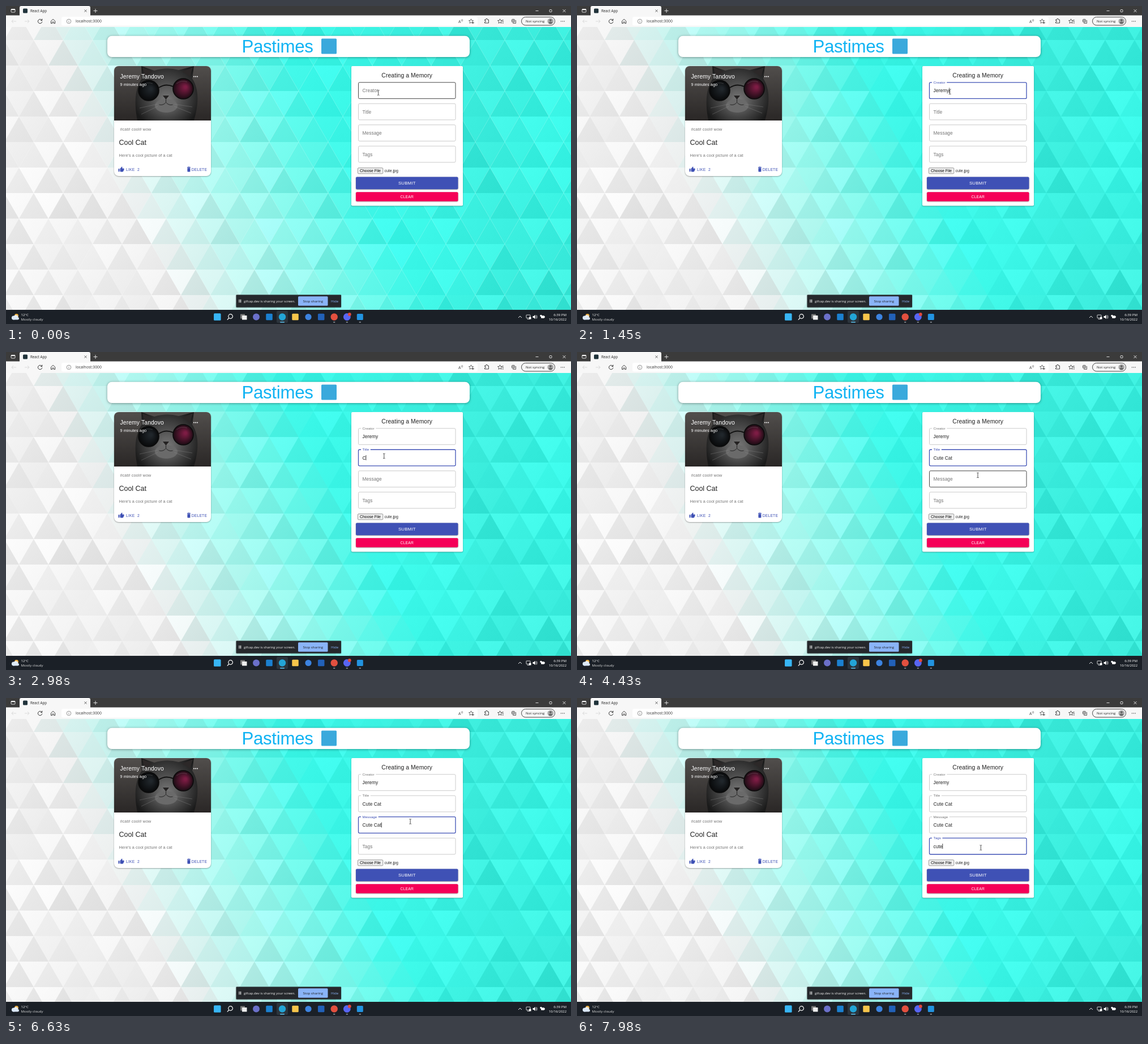
These frames come from a looping animation (998x561 px, 8 s). An HTML page with a canvas:

```html
<!DOCTYPE html>
<html lang="en">
<head>
<meta charset="utf-8">
<title>Creating a Memory</title>
<style>
html, body { margin: 0; width: 100%; height: 100%; overflow: hidden; }
canvas { display: block; }
</style>
</head>
<body>
<canvas id="stage" width="998" height="561"></canvas>
<script>
const W = 998, H = 561, LOOP = 8000;
const ARIAL = '"Liberation Sans", Arial, sans-serif';
const UI = '"Open Sans", "Noto Sans", sans-serif';
const INDIGO = '#3f51b5', INK = '#212121', GREY = '#757575';
const screen = document.getElementById('stage').getContext('2d');
const backdrop = document.createElement('canvas');
backdrop.width = W;
backdrop.height = H;
let g = backdrop.getContext('2d');

const clamp = v => Math.max(0, Math.min(1, v));
const lerp = (a, b, k) => a + (b - a) * k;
const mix = (a, b, k) => a.map((v, i) => lerp(v, b[i], k));
const rgb = c => `rgb(${c.map(Math.round)})`;
const noise = n => { const v = Math.sin(n * 127.1 + 11.7) * 43758.5453; return v - Math.floor(v); };

// y is the middle of the capitals; spacing is in em
function text(s, x, y, size, color, { font = ARIAL, align = 'left', spacing = 0, weight = 400 } = {}) {
  g.font = `${weight} ${size}px ${font}`;
  g.letterSpacing = spacing * size + 'px';
  g.textAlign = align;
  g.fillStyle = color;
  g.fillText(s, x, y + size * 0.36);
}
const ui = (s, x, y, size, color, opts) => text(s, x, y, size, color, { font: UI, ...opts });

function box(x, y, w, h, r, fill, blur = 0) {
  g.save();
  if (blur) {
    g.shadowColor = 'rgba(0,0,0,.4)';
    g.shadowBlur = blur;
    g.shadowOffsetY = 0.8;
  }
  g.fillStyle = fill;
  g.beginPath();
  g.roundRect(x, y, w, h, r);
  g.fill();
  g.restore();
}
function frame(x, y, w, h, r, color, width = 1) {
  g.strokeStyle = color;
  g.lineWidth = width;
  g.beginPath();
  g.roundRect(x, y, w, h, r);
  g.stroke();
}
function oval(x, y, rx, ry, fill) {
  g.fillStyle = fill;
  g.beginPath();
  g.ellipse(x, y, rx, ry, 0, 0, 7);
  g.fill();
}
const dot = (x, y, r, fill) => oval(x, y, r, r, fill);
const square = (x, y, size, fill) => box(x - size / 2, y - size / 2, size, size, 1.5, fill);
function line(d, color, width = 0.8) {
  g.strokeStyle = color;
  g.lineWidth = width;
  g.stroke(new Path2D(d));
}
function shape(d, color) {
  g.fillStyle = color;
  g.fill(new Path2D(d));
}

const bump = (x, y, rx, ry) => Math.exp(-((x / rx) ** 2 + (y / ry) ** 2));

// White on the left turns to turquoise along a slanted edge, with a few bright patches
function drawTriangles() {
  const side = 52, rowH = 45;
  for (let r = 0; r < 12; r++) {
    const top = 15 + r * rowH;
    for (let i = -2; i < 42; i++) {
      const x = i * side / 2 - 3, up = (i + r) % 2 === 0, mid = x + side / 2;
      const cyan = clamp((mid - 45 - top * 0.53) / 430);
      const glow = clamp(bump(mid - 560, top - 120, 190, 190) + bump(mid - 710, top - 420, 150, 140)
        + bump(mid - 990, top - 220, 100, 170));
      const base = mix(mix([240, 240, 240], [160, 250, 240], clamp(cyan * 2)), [62, 236, 220], clamp(cyan * 2 - 1));
      const lit = mix(base, [Math.min(base[0], 150), 255, 240], glow * 0.8 * clamp(cyan * 2));
      const shade = ((up ? -7 : 6) + (noise(r * 61 + i) - 0.5) * 14) * (1 - glow * 0.3);
      const color = lit.map(v => Math.min(255, v + shade));
      const fill = g.createLinearGradient(x, top, x + side, top + rowH);
      fill.addColorStop(0, rgb(mix(color, [255, 255, 255], 0.1 * (1 - cyan))));
      fill.addColorStop(1, rgb(color.map(v => v - 4)));
      const a = up ? top + rowH : top, b = up ? top : top + rowH;
      shape(`M${x} ${a}h${side}L${mid} ${b}z`, fill);
    }
  }
}

function drawBrowser() {
  box(0, 0, W, 17, 0, '#3b3b3b');
  box(0, 16.5, W, 20.5, 0, '#f7f7f7');
  box(24, 0, 125, 18, [3, 3, 0, 0], '#f7f7f7');
  frame(9, 5.5, 7, 5.5, 1, '#fff', 0.8);
  box(9, 5.5, 7, 1.6, 0, '#fff');
  square(34, 8.5, 8, '#20333b');
  ui('React App', 43, 8.5, 6.2, '#222');
  line('M138.5 6.5l4 4m0-4l-4 4', '#333');
  line('M154.5 8.5h7m-3.5-3.5v7M935.5 8.5h5M983.5 6l5 5m0-5l-5 5', '#fff');
  frame(960, 6.5, 4, 4, 1, '#fff', 0.8);

  box(98, 19, 735, 15.5, 3, '#fff');
  line('M18 27h-8m3-3l-3 3l3 3M33 27h8m-3-3l3 3l-3 3', '#d2d2d2');
  line('M63.2 25a3.7 3.7 0 1 0 .6 2.6M63.8 22.6v2.8h-2.8', '#333', 1);
  line('M79.5 26.5l3.6-3.2l3.6 3.2v4.2h-2.4v-2.6h-2.4v2.6h-2.4z', '#333', 0.9);
  line('M107.2 27a3.8 3.8 0 1 0 7.6 0a3.8 3.8 0 1 0-7.6 0M111 26.4v2.6M111 24.8v.8', '#666', 0.7);
  ui('localhost:3000', 123, 27, 6.8, '#333');
  ui('A', 799, 27.5, 7, '#444');
  line('M804 24q1.5 1 0 2.5M805.5 23q2.5 2 0 4.5', '#444', 0.6);
  const star = 'l1.2 2.6l2.8.3l-2.1 1.9l.6 2.8l-2.5-1.4l-2.5 1.4l.6-2.8l-2.1-1.9l2.8-.3z';
  line('M821.5 22.8' + star + 'M823 29.5h4m-2-2v4', '#444', 0.8);
  line('M845.5 24.2h2q0-2 1.5-2t1.5 2h2v5.8h-7v-1.8q2 0 2-1.4t-2-1.4z', '#333', 0.9);
  line('M872.5 22.8' + star + 'M876 25h3M876.5 27.5h2.5M876.5 30h2.5', '#333', 0.8);
  frame(893.5, 23.5, 5, 5, 1, '#333', 0.9);
  line('M895 30.5h5.5v-5.5M896 24.5v3M894.5 26h3', '#333', 0.8);
  frame(910.5, 19.5, 59, 14.5, 7.2, '#333', 0.9);
  ui('Not syncing', 918, 27, 6.1, '#222');
  dot(961.8, 26.8, 5.4, '#aaa');
  dot(961.8, 25.2, 1.9, '#666');
  oval(961.8, 29.6, 3.1, 1.9, '#666');
  for (const x of [980.5, 983.3, 986.1]) dot(x, 27, 0.7, '#333');
}

function drawCat() {
  g.save();
  g.beginPath();
  g.roundRect(191, 106, 171, 96, [8, 8, 0, 0]);
  g.clip();
  const wall = g.createLinearGradient(0, 106, 0, 202);
  wall.addColorStop(0, '#514e4c');
  wall.addColorStop(1, '#2a2726');
  box(191, 106, 171, 96, 0, wall);
  const fur = g.createRadialGradient(284, 168, 4, 284, 156, 62);
  fur.addColorStop(0, '#757575');
  fur.addColorStop(0.45, '#4a4a4a');
  fur.addColorStop(1, '#1a1a1a');
  shape('M232 202C226 170 228 145 240 128L239 106L262 114Q284 107 305 113L332 106L329 128C342 148 340 175 332 202z', fur);
  shape('M241 108l4 17l13-9zM330 108l-5 16l-14-8z', '#2c2828');
  oval(283, 176, 20, 12, '#6a6a6a');
  shape('M277 158h11l-5.5 7z', '#242222');
  line('M282.5 165v5q-5 6-12 4M282.5 170q5 6 12 4', '#262626', 1);
  line('M268 173l-32 7M268 177l-29 14M297 173l32 5M297 177l30 12', '#888', 0.4);
  for (const [x, y, inner, outer] of [[252, 149, '#20262b', '#08090a'], [313, 146, '#7d1c44', '#1b0c13']]) {
    const lens = g.createRadialGradient(x + 4, y - 3, 2, x, y, 18);
    lens.addColorStop(0, inner);
    lens.addColorStop(1, outer);
    dot(x, y, 18, lens);
    line(`M${x - 18} ${y}a18 18 0 1 0 36 0a18 18 0 1 0-36 0`, '#0b0b0b', 1.6);
    line(`M${x - 12} ${y - 9}q9-7 19-3`, 'rgba(255,255,255,.2)', 0.8);
  }
  line('M270 144q12-8 25-2', '#111', 2);
  g.restore();
}

function drawPost() {
  box(191, 106, 171, 194, 8, '#fff', 2);
  drawCat();
  text('Jeremy Tandovo', 201.5, 124.5, 10.4, '#fff', { spacing: 0.0075 });
  const small = { spacing: 0.0107 };
  text('9 minutes ago', 201.5, 138, 7.28, '#fff', small);
  for (const x of [332, 335, 338]) dot(x, 124.5, 1, '#fff');
  text('#cat# cool# wow', 201.5, 217.3, 7.28, GREY, small);
  text('Cool Cat', 199.5, 241, 12.48, INK);
  text("Here's a cool picture of a cat", 199.5, 263.3, 7.28, GREY, small);
  box(198.5, 287, 2, 5.2, 0, INDIGO);
  shape('M201.5 287l3.2-3.7l.9.9l-.5 2.3h2.6q1.2.2 1 1.4l-1.4 3.7q-.4.8-1.2.8h-3.4q-1.2-.2-1.2-1.2z', INDIGO);
  const caps = { spacing: 0.0286 };
  text('LIKE', 212, 288.2, 6.76, INDIGO, caps);
  text('2', 232, 288.2, 6.76, INDIGO, caps);
  shape('M320 285h5.8v-.9h-1.5l-.5-.5h-1.8l-.5.5h-1.5zM320.4 285.6h5v6q0 .9-.9.9h-3.2q-.9 0-.9-.9z', INDIGO);
  text('DELETE', 327.7, 288.2, 6.76, INDIGO, caps);
}

function drawForm() {
  box(610, 106, 197, 246.5, 2, '#fff', 2);
  text('Creating a Memory', 708.2, 122.3, 10.4, INK, { align: 'center', spacing: 0.0075 });
  box(621, 285.3, 45, 10.8, 1.5, '#efefef');
  frame(621.4, 285.6, 44.4, 10.2, 1.5, '#767676', 0.7);
  text('Choose File', 625, 291, 6.93, '#000');
  text('cute.jpg', 668.5, 291, 6.93, '#222');
  const caps = { align: 'center', spacing: 0.0286 };
  box(618, 301.5, 180.5, 21.7, 2, INDIGO, 2);
  text('SUBMIT', 708.3, 312.3, 7.8, '#fff', caps);
  box(618, 328.3, 180.5, 16.2, 2, '#f50057', 2);
  text('CLEAR', 708.3, 336.3, 6.76, '#fff', caps);
}

function drawShareBar() {
  box(406.5, 509.5, 185.5, 22, 1, '#25282c', 2);
  box(411.5, 517.7, 1.1, 5.6, 0, '#fff');
  box(414, 517.7, 1.1, 5.6, 0, '#fff');
  ui('gifcap.dev is sharing your screen.', 420, 520.5, 5.9, '#f1f1f1');
  box(516, 512.3, 52.5, 16.5, 1.5, '#8ab4f8');
  ui('Stop sharing', 542.2, 520.5, 6.1, '#202124', { align: 'center' });
  ui('Hide', 574, 520.5, 6.1, '#8ab4f8');
}

function drawTaskbar() {
  const y = 548.5;
  box(0, 536, W, 25, 0, '#1b2027');
  dot(18.5, 546.5, 3.4, '#f3b443');
  dot(13.5, 550, 3.6, '#d8e6f7');
  dot(17.5, 549, 3.8, '#e6effb');
  box(11, 549, 12, 4.6, 2.3, '#dbe8f8');
  ui('12°C', 26.5, 545, 6.1, '#fff');
  ui('Mostly cloudy', 26.5, 553, 6.1, '#ddd');

  box(478, 538, 20, 21, 2, '#2c343c');
  square(373.3, y, 12.5, '#38b6f5');
  line('M392.8 547.5a3.8 3.8 0 1 0 7.6 0a3.8 3.8 0 1 0-7.6 0M393.8 550.5l-3 3.2', '#fff', 1.2);
  box(414, 543.5, 8, 8, 0.5, '#777');
  box(417, 546, 8.5, 7.5, 0.5, '#eee');
  dot(442, y, 6, '#6b70ca');
  square(465, y, 11.5, '#1b80d0');
  dot(488, y, 6.2, '#23a4d6');
  square(511, y, 11.5, '#f6c54b');
  dot(534, y, 5.6, '#3c83e0');
  square(556.7, y, 11.5, '#2261b8');
  dot(579.7, y, 6.2, '#e2503f');
  dot(602.3, y, 6.4, '#5865f2');
  dot(606.8, 544, 2.9, '#e0493c');
  square(625.3, y, 11, '#2293e0');
  box(484, 557, 8, 1.4, 0.7, '#5cc4f2');
  for (const x of [579.7, 602.3, 625.3]) box(x - 1.7, 557, 3.4, 1.4, 0.7, '#9a9fa5');

  line('M905 550l3-3l3 3', '#fff', 0.9);
  frame(919, 545, 7, 5.5, 0.5, '#fff', 0.8);
  line('M920.5 552.5h4.5', '#fff');
  box(924, 548.5, 3.5, 4, 0.5, '#fff');
  shape('M930.5 547h1.8l2.4-2.2v7.4l-2.4-2.2h-1.8z', '#fff');
  line('M935.8 546.5q1.6 2 0 4M937 545.2q2.6 3.3 0 6.6', '#fff', 0.7);
  box(945, 546.3, 6, 4.4, 1, '#fff');
  box(951, 547.6, 1, 1.8, 0, '#fff');
  dot(945, 546.5, 1.7, '#fff');
  ui('6:39 PM', 990, 544.8, 6.1, '#fff', { align: 'right' });
  ui('10/16/2022', 990, 552.8, 5.9, '#fff', { align: 'right' });
}

function drawBackdrop() {
  drawTriangles();
  drawBrowser();
  box(179, 52.8, 640, 37.2, 8, '#fff', 4);
  text('Pastimes', 479.5, 70.7, 31.2, '#10b3f3', { align: 'center', spacing: -0.0083 });
  square(570.5, 71, 27, '#3aa9dc');
  drawPost();
  drawForm();
  drawShareBar();
  drawTaskbar();
}

const refreshes = [
  0, [90, 330, 4], 660, 910, [1150, 1450, 5], [1950, 2020, 2], [2190, 2420, 4], 2740, 2980,
  [3150, 3310, 3], 3560, 3810, 4050, [4200, 4430, 4], [4600, 4760, 3], 5080, 5250, [5400, 5560, 3],
  5880, 6140, [6390, 6460, 2], [6630, 6700, 2], [6870, 7330, 7], 7570, [7810, 7980, 3]
].flatMap(s => s.length
  ? Array.from({ length: s[2] }, (_, i) => lerp(s[0], s[1], i / (s[2] - 1)))
  : s);
const snap = t => refreshes.findLast(s => s <= t);

const fields = [
  { label: 'Creator', value: 'Jeremy', focus: 150, keys: [910, 1150, 1225, 1300, 1375, 1450] },
  { label: 'Title', value: 'Cute Cat', focus: 2210, keys: [2980, 3150, 3230, 3310, 3310, 3560, 3810, 3810] },
  { label: 'Message', value: 'Cute Cat', focus: 4560, keys: [5250, 5400, 5480, 5560, 5880, 6140, 6390, 6460] },
  { label: 'Tags', value: 'cute', focus: 7080, keys: [7570, 7810, 7895, 7980] }
];
const pointerPath = [
  [0, 657.7, 153], [90, 658.7, 151.3], [1880, 658.7, 151.3], [2020, 667.8, 183.5], [3900, 667.8, 183.5],
  [4050, 668.6, 183.3], [4200, 674, 188], [4430, 708, 217.3], [4600, 709.3, 217.3], [6560, 709.3, 217.3],
  [6700, 719, 218.5], [6870, 718, 230], [7020, 713.3, 264], [LOOP, 713.3, 264]
];
function pointerAt(t) {
  const i = pointerPath.findIndex(p => p[0] > t);
  const a = pointerPath[i - 1], b = pointerPath[i];
  return mix(a, b, (t - a[0]) / (b[0] - a[0])).slice(1);
}

function drawField(field, i, t, pointer) {
  const x = 622.5, w = 171.5, h = 28.6, top = 134.8 + i * 37.45, mid = top + 14.4;
  const blur = fields[i + 1]?.focus ?? Infinity;
  const focused = t >= field.focus && t < blur;
  const hover = Math.abs(pointer[1] - mid) < h / 2;
  const k = clamp((t - field.focus) / 200), rise = 1 - (1 - k) ** 3;
  const blue = focused ? rise : t < blur ? 0 : 1 - clamp((t - blur) / 200);
  const body = { spacing: 0.0094 };

  frame(x, top, w, h, 2, focused ? INDIGO : hover ? '#333' : '#c6c6c6', focused ? 1.3 : 0.9);
  const size = lerp(8.32, 6.24, rise), y = lerp(mid, top - 0.2, rise);
  g.font = `6.24px ${ARIAL}`;
  g.letterSpacing = '0.06px';
  const gap = (g.measureText(field.label).width + 5) * k;
  if (gap) box(627, top - 1.2, gap, 2.4, 0, '#fff');
  text(field.label, 629.5, y, size, rgb(mix([117, 117, 117], [63, 81, 181], blue)), body);

  const pressed = field.keys.filter(key => key <= t + 0.01);
  const typed = field.value.slice(0, pressed.length);
  text(typed, 629.5, mid, 8.32, INK, body);
  if (focused && t - (pressed.at(-1) ?? field.focus) < 500) {
    box(629.4 + g.measureText(typed).width, mid - 4.6, 0.8, 9, 0, '#111');
  }
}

function drawPointer([x, y]) {
  const beam = `M${x - 1.8} ${y - 4.3}h1.2l.6.6l.6-.6h1.2M${x} ${y - 3.7}v7.4M${x - 1.8} ${y + 4.3}h1.2l.6-.6l.6.6h1.2`;
  line(beam, 'rgba(255,255,255,.8)', 1.8);
  line(beam, '#222', 0.8);
}

drawBackdrop();
g = screen;
function tick(now) {
  const t = snap(now % LOOP), pointer = pointerAt(t);
  g.drawImage(backdrop, 0, 0);
  fields.forEach((field, i) => drawField(field, i, t, pointer));
  drawPointer(pointer);
  requestAnimationFrame(tick);
}
requestAnimationFrame(tick);
</script>
</body>
</html>
```
